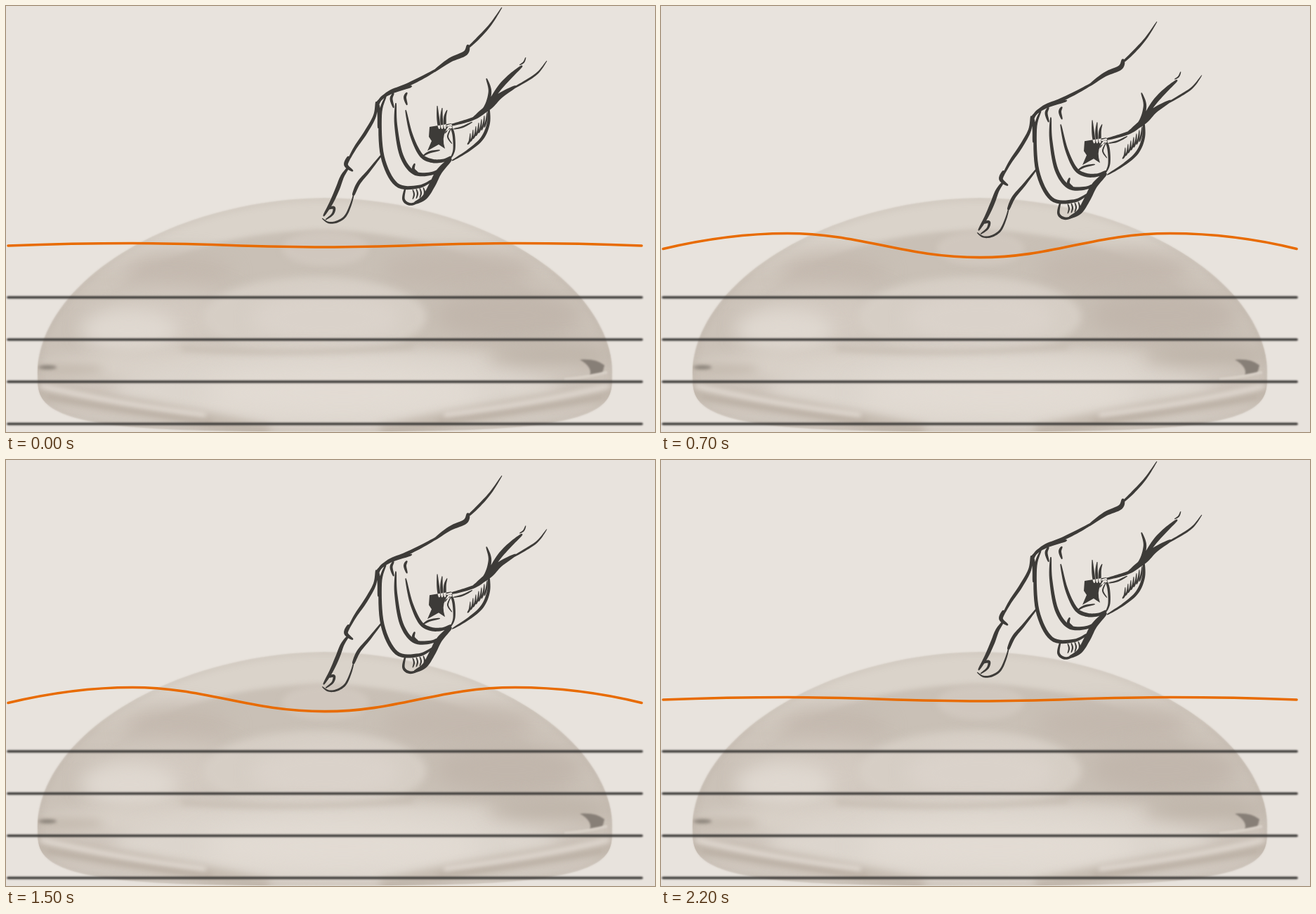
These frames come from a looping animation (924 by 606 pixels, 2300 ms). An HTML page with a canvas:

```html
<!DOCTYPE html>
<html lang="en">
<head>
<meta charset="utf-8">
<title>Finger pressing a soft dome</title>
<style>
  html, body { margin: 0; width: 100%; height: 100%; overflow: hidden; background: #e8e3dd; }
  canvas { display: block; width: 924px; height: 606px; }
</style>
</head>
<body>
<canvas id="stage" width="924" height="606"></canvas>
<script>
const W = 924, H = 606, STEP = 100, STEPS = 23, PEAK = 11;
const INK = '#3d3b38', ORANGE = '#e86b00', PAPER = '#e8e3dd', LINE = 3.6;
const ctx = document.getElementById('stage').getContext('2d');
const lerp = (a, b, t) => a + (b - a) * t;

// Smooth curve through key points; the nib swells in the middle and thins at both ends.
// A lean above 1 moves the swell towards the end, below 1 towards the start.
function ink(path, width, lean, ...n) {
  const last = n.length / 2 - 1, steps = last * 8;
  const key = (i, k) => n[2 * Math.max(0, Math.min(last, i)) + k];
  const spline = (u, k) => {
    const i = Math.min(last - 1, Math.floor(u)), t = u - i;
    const a = key(i - 1, k), b = key(i, k), c = key(i + 1, k), d = key(i + 2, k);
    return b + t / 2 * (c - a + t * (2 * a - 5 * b + 4 * c - d + t * (3 * (b - c) + d - a)));
  };
  const left = [], right = [];
  for (let s = 0; s <= steps; s++) {
    const u = s / 8, v = Math.max(0, u - .05), w = Math.min(last, u + .05);
    const dx = spline(w, 0) - spline(v, 0), dy = spline(w, 1) - spline(v, 1);
    const swell = Math.sin(Math.PI * (s / steps) ** lean);
    const r = width / 2 * (.25 + .75 * Math.max(0, swell) ** .6) / (Math.hypot(dx, dy) || 1);
    left.push([spline(u, 0) - dy * r, spline(u, 1) + dx * r]);
    right.unshift([spline(u, 0) + dy * r, spline(u, 1) - dx * r]);
  }
  left.concat(right).forEach(([x, y], i) => i ? path.lineTo(x, y) : path.moveTo(x, y));
  path.closePath();
}

function makeHand() {
  const hand = new Path2D();
  const draw = (...args) => ink(hand, ...args);

  // forearm and knuckle
  draw(4, 1.6, 706, 2, 690, 26, 672, 46, 655, 62);
  draw(7, .8, 658, 55, 654, 67, 632, 77, 608, 94);
  draw(5, 1, 622, 85, 598, 99, 570, 113, 545, 123, 527, 138);
  draw(5, .7, 578, 114, 550, 122, 533, 133, 527, 150);

  // index finger
  draw(5, 1, 527, 136, 525, 156, 512, 180, 497, 202, 485, 224);
  draw(6, .6, 489, 214, 484, 226, 494, 235);
  draw(6, 1, 488, 229, 479, 242, 472, 260, 463, 280, 452, 299);
  draw(3, 1, 450, 302, 459, 308, 471, 307, 483, 299, 491, 282, 496, 264);
  draw(5, .6, 494, 270, 502, 252, 517, 234, 536, 210);
  draw(4, .5, 459, 288, 467, 287, 465, 296, 455, 304);

  // curled fingers, each one a blend of the outermost and innermost
  const outer = [541, 128, 533, 155, 536, 214, 556, 254, 588, 257, 609, 246];
  const inner = [569, 148, 577, 183, 590, 211, 605, 220, 622, 220, 634, 214];
  for (let f = 0; f < 3; f++) {
    draw(5.5, 1.1, ...outer.map((v, i) => lerp(v, inner[i], f / 2)));
    if (f) draw(4, 1, 533 + f * 19, 125 - f, 529 + f * 19.5, 134 - f * 2, 533 + f * 19, 149 - f * 4);
  }
  draw(5, .6, 529, 138, 531, 154, 530, 174);
  draw(4, 1, 582, 224, 580, 232, 587, 238);

  // little finger
  draw(9, .8, 634, 217, 617, 235, 607, 254, 596, 272, 581, 281);
  draw(4, 1, 592, 277, 576, 282, 566, 275, 569, 257);
  for (let i = 0; i < 4; i++) {
    const x = 579 + i * 5, y = 261 - i;
    draw(2.2, 1, x, y, x + 2, y + 7, x, y + 14);
  }

  // thumb with its deep shadow and creases
  hand.addPath(new Path2D('M603 172L634 167L636 173L626 178Q620 188 625 203L616 197L600 206L606 192L602 186Z'));
  for (let i = 0; i < 3; i++) draw(4, 1.8, 614 + i * 7, 142 + i * 3, 615 + i * 5, 158, 617 + i * 4, 175);
  draw(4.5, 1.2, 626, 171, 647, 166, 670, 158, 690, 144);
  draw(3.5, 1, 625, 181, 632, 172, 637, 182, 638, 204, 633, 217);
  draw(2, 1, 633, 175, 629, 186, 635, 196);
  draw(3, 1, 594, 213, 603, 208, 618, 205);
  draw(4.5, .8, 687, 142, 687, 166, 678, 188, 659, 205, 635, 220);
  draw(2.5, 1, 637, 175, 650, 172, 664, 165);
  for (let i = 0; i < 7; i++) {
    const x = 685 - i * 4, y = 151 + i * 5;
    draw(2.6, 1.4, x, y, x - 1, y + 11, x - 4, y + 22 - i);
  }

  // wrist
  draw(5, 1.2, 684, 103, 689, 122, 682, 145, 664, 160);
  draw(3, 1.3, 770, 78, 757, 95, 738, 108, 706, 126);
  draw(9, 1.2, 726, 114, 703, 128, 688, 143, 668, 158);
  draw(2, 1, 740, 73, 737, 80, 731, 84);
  draw(7, 1.2, 735, 85, 719, 99, 703, 116, 686, 141);
  return hand;
}

// Superellipse whose upper and lower halves have their own height and squareness.
function blob(cx, cy, rx, up, down, nUp, nDown) {
  const p = new Path2D();
  for (let i = 0; i < 180; i++) {
    const a = i * Math.PI / 90, c = Math.cos(a), s = Math.sin(a);
    const n = s < 0 ? nUp : nDown, h = s < 0 ? up : down;
    p.lineTo(cx + rx * Math.sign(c) * Math.abs(c) ** (2 / n),
             cy + h * Math.sign(s) * Math.abs(s) ** (2 / n));
  }
  p.closePath();
  return p;
}

function makeBackdrop() {
  const c = document.createElement('canvas');
  c.width = W; c.height = H;
  const g = c.getContext('2d');
  g.fillStyle = PAPER;
  g.fillRect(0, 0, W, H);

  const soft = (color, blur, shape) => {
    g.filter = `blur(${blur}px)`;
    g.fillStyle = color;
    g.fill(shape);
  };
  const glow = (color, blur, x, y, rx, ry) => soft(color, blur, blob(x, y, rx, ry, ry, 2, 2));
  const sweep = (color, blur, width, d) => {
    g.filter = `blur(${blur}px)`;
    g.strokeStyle = color;
    g.lineWidth = width;
    g.stroke(new Path2D(d));
  };

  const dome = blob(454, 520, 409, 247, 85, 1.9, 3.6);
  const fade = g.createLinearGradient(0, 273, 0, H);
  ['#dad3ca', '#dad3ca', '#cfc6bc', '#cbc2b8', '#cbc2b8', '#d0c7be', '#d2cac1']
    .forEach((color, i) => fade.addColorStop(i / 6, color));
  soft(fade, 1, dome);
  g.save();
  g.clip(dome);

  // darker inner shell, seen below the bright cap
  soft('#c9c0b6', 3, blob(450, 480, 340, 161, 20, 1.9, 2));
  glow('#c4b9af', 14, 245, 380, 75, 28);
  glow('#c3b8ae', 14, 645, 375, 110, 28);
  glow('#c1b6ac', 14, 715, 440, 105, 36);
  glow('#d0c7be', 4, 455, 345, 62, 25);

  // reflections
  glow('#d3cac1', 18, 230, 450, 110, 48);
  glow('#d6cec5', 6, 440, 442, 158, 57);
  glow('#dad2ca', 12, 455, 445, 105, 40);
  glow('#dfd8d0', 13, 175, 462, 70, 30);

  // pale floor between shaded flanks
  glow('#d8d0c7', 9, 430, 512, 390, 26);
  glow('#dcd5cd', 12, 470, 548, 320, 52);
  glow('#e2dbd3', 18, 480, 550, 200, 38);
  glow('#bfb5aa', 12, 775, 497, 90, 18);
  glow('#c5bbb0', 7, 80, 517, 60, 9);
  sweep('#c3b9ae', 4, 5, 'M250 487Q400 499 580 484');

  // curved folds along the base
  for (const side of [1, -1]) {
    g.save();
    g.translate(454, 0);
    g.scale(side, 1);
    sweep('#c4baaf', 6, 24, 'M-415 548Q-250 572 -80 608');
    sweep('#ddd5cd', 3, 8, 'M-406 540Q-300 566 -170 582');
    sweep('#b8ada2', 3, 4, 'M-395 556Q-300 574 -160 592');
    g.restore();
  }

  // creases at the widest points
  glow('#8d857c', 2, 59, 514, 13, 3);
  soft('#877f77', 1, new Path2D('M817 503Q840 501 852 511L849 523L831 526Q836 514 817 503Z'));
  sweep('#d8d0c7', 1, 4, 'M795 531Q830 528 856 521');

  g.filter = 'blur(5px)';
  g.strokeStyle = 'rgba(176,164,151,.35)';
  g.lineWidth = 5;
  g.stroke(dome);
  g.restore();

  g.strokeStyle = INK;
  g.lineWidth = LINE;
  g.lineCap = 'round';
  for (let y = 414.5; y < H; y += 60) {
    g.beginPath();
    g.moveTo(3, y);
    g.lineTo(905, y);
    g.stroke();
  }
  return c;
}

const hand = makeHand(), backdrop = makeBackdrop();

function drawWave(k) {
  const end = 340.1 + .64 * k, crest = 340.3 - 2 * k, dip = 340 + 2.1 * k;
  const rise = 340.2 - .98 * k;
  ctx.beginPath();
  ctx.moveTo(3, end);
  ctx.bezierCurveTo(60, rise, 120, crest, 180, crest);
  ctx.bezierCurveTo(285, crest, 345, dip, 454, dip);
  ctx.bezierCurveTo(560, dip, 615, crest, 725, crest);
  ctx.bezierCurveTo(790, crest, 850, rise, 905, end);
  ctx.strokeStyle = ORANGE;
  ctx.lineWidth = LINE;
  ctx.lineCap = 'round';
  ctx.stroke();
}

function draw(step) {
  const press = PEAK - Math.abs(step - PEAK);
  ctx.drawImage(backdrop, 0, 0);
  drawWave(press + 1.4);
  ctx.save();
  ctx.translate(0, press * 2.91);
  ctx.fillStyle = INK;
  ctx.fill(hand);
  ctx.restore();
}

const start = performance.now();
let shown = -1;
function tick() {
  const step = Math.floor((performance.now() - start) / STEP) % STEPS;
  if (step !== shown) draw(shown = step);
  requestAnimationFrame(tick);
}
tick();
</script>
</body>
</html>
```
